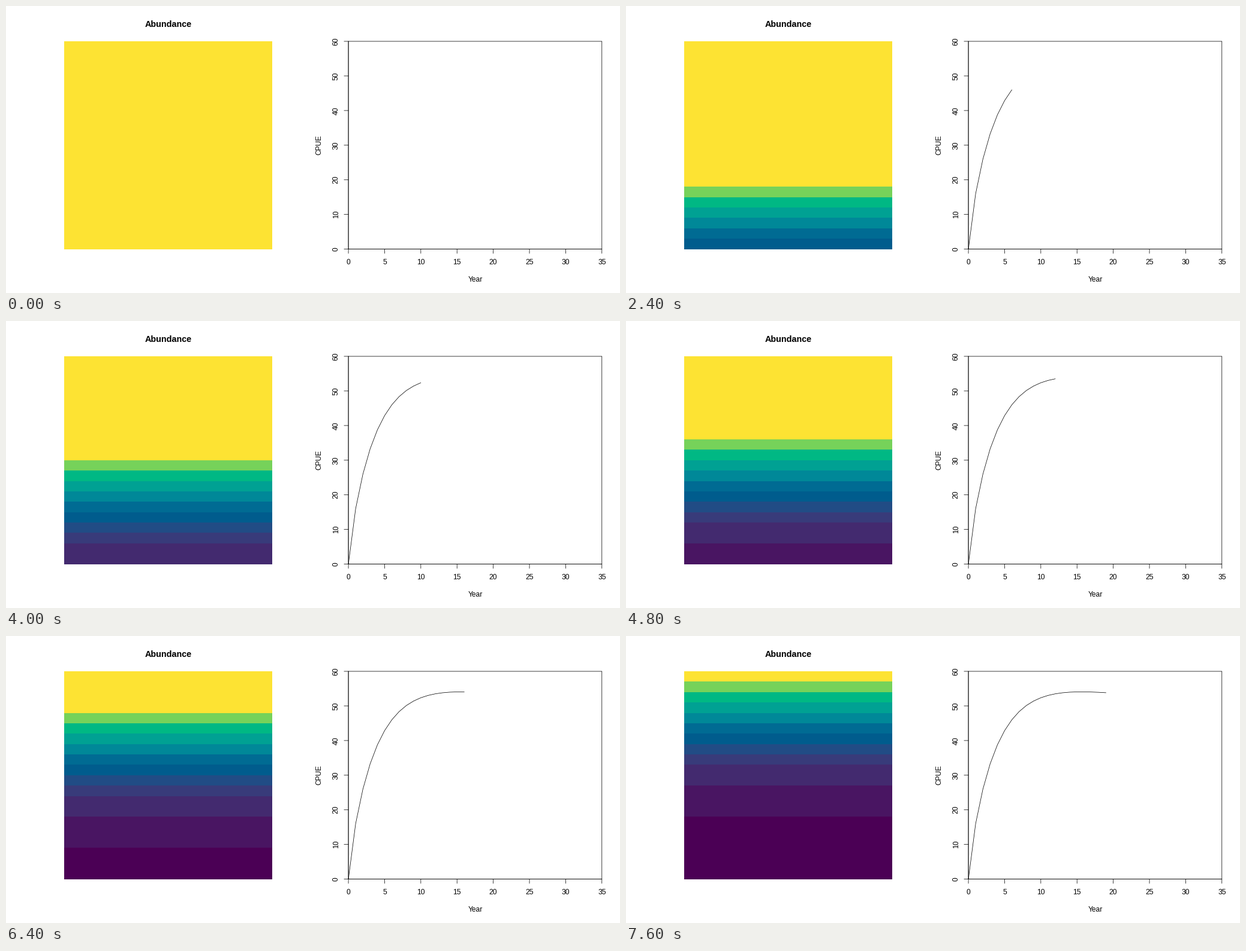
These frames come from a looping animation (1024 px wide and 480 px high, 8 s). A matplotlib script:

```python
import math

import matplotlib.pyplot as plt
from matplotlib.animation import FuncAnimation
from matplotlib.patches import Rectangle

W, H, DPI = 1024, 480, 64
PX = 72 / DPI                  # points per pixel
LINE = 14.4                    # margin line height
LW = 0.75 * PX
TOP, BOTTOM = 4.1 * LINE, H - 5.1 * LINE
LEFT, RIGHT = W / 2 + 4.1 * LINE, W - 2.1 * LINE
SIDE = BOTTOM - TOP
MID = W / 4 + LINE
ROWS, SHADES, SURVIVAL = 20, 20, 0.8

plt.rcParams["font.family"] = "Liberation Sans"


def hcl(h, c, l):
    """Polar CIE-LUV to sRGB."""
    y = ((l + 16) / 116) ** 3 if l > 8 else l / 903.3
    u = c * math.cos(math.radians(h)) / (13 * l) + 0.1978398
    v = c * math.sin(math.radians(h)) / (13 * l) + 0.4683363
    x = 9 * y * u / (4 * v)
    z = -x / 3 - 5 * y + 3 * y / v
    linear = (3.240479 * x - 1.537150 * y - 0.498535 * z,
              -0.969256 * x + 1.875992 * y + 0.041556 * z,
              0.055648 * x - 0.204043 * y + 1.057311 * z)

    def gamma(a):
        a = 1.055 * a ** (1 / 2.4) - 0.055 if a > 0.00304 else 12.92 * a
        return min(max(a, 0), 1)

    return tuple(gamma(a) for a in linear)


def shade(abundance):
    k = int((SHADES - 1e-5) * abundance)
    i = 1 - k / (SHADES - 1)
    return hcl(75 + 225 * i, 95 - 55 * i, 90 - 75 * i ** 1.1)


def cpue(year):
    if year == 0:
        return 0
    return 80 * (1 - SURVIVAL ** year) / (1 + 0.158 * math.log(year))


def x_of(year):
    return LEFT + (RIGHT - LEFT) * year / 35


def y_of(value):
    return BOTTOM - SIDE * value / 60


fig = plt.figure(figsize=(W / DPI, H / DPI), dpi=DPI, facecolor="white")
ax = fig.add_axes([0, 0, 1, 1])
ax.set(xlim=(0, W), ylim=(H, 0))
ax.axis("off")


def stroke(xs, ys, cap="round"):
    return ax.plot(xs, ys, color="black", lw=LW, snap=False,
                   solid_capstyle=cap, solid_joinstyle="round")[0]


def label(x, y, text, size=12, **style):
    ax.text(x, y, text, fontsize=size * PX, ha="center", va="baseline",
            rotation_mode="anchor", **style)


# Abundance panel
label(MID, 35, "Abundance", 14.4, weight="bold")
edges = [round(BOTTOM - SIDE * i / ROWS) for i in range(ROWS + 1)]
x0, x1 = round(MID - SIDE / 2), round(MID + SIDE / 2)
bands = [ax.add_patch(Rectangle((x0, hi), x1 - x0, lo - hi, lw=0,
                                antialiased=False))
         for lo, hi in zip(edges, edges[1:])]

# Catch panel
stroke([LEFT, RIGHT, RIGHT, LEFT, LEFT], [BOTTOM, BOTTOM, TOP, TOP, BOTTOM])
stroke([LEFT, RIGHT], [BOTTOM, BOTTOM])
stroke([LEFT, LEFT], [BOTTOM, TOP])
for year in range(0, 36, 5):
    x = x_of(year)
    stroke([x, x], [BOTTOM, BOTTOM + LINE / 2])
    label(x, 432, str(year))
for value in range(0, 61, 10):
    y = y_of(value)
    stroke([LEFT - LINE / 2, LEFT], [y, y])
    label(LEFT - 1.2 * LINE, y, str(value), rotation=90)
label((LEFT + RIGHT) / 2, 461, "Year")
label(LEFT - 3.2 * LINE, (TOP + BOTTOM) / 2, "CPUE", rotation=90)
curve = stroke([], [])


def update(year):
    for row, band in enumerate(bands):
        band.set_facecolor(shade(SURVIVAL ** max(year - row, 0)))
    years = range(year + 1) if year else []
    curve.set_data([x_of(t) for t in years], [y_of(cpue(t)) for t in years])
    return [*bands, curve]


anim = FuncAnimation(fig, update, frames=ROWS, interval=400, repeat=True,
                     repeat_delay=0, blit=False)
plt.show()
```
